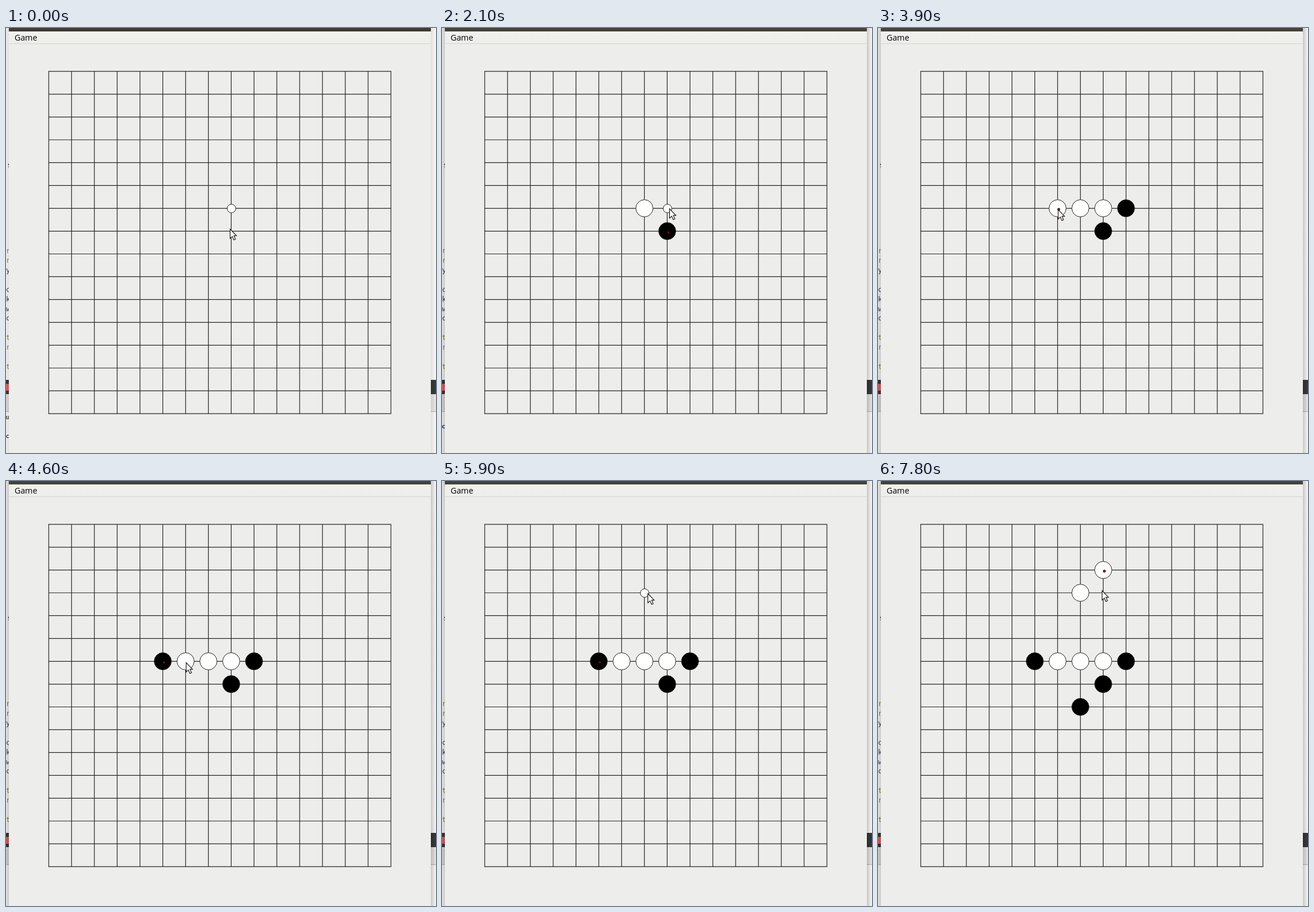
Animation, 753 px wide and 744 px high, one loop 8 s. Source, as an HTML page:

```html
<!DOCTYPE html>
<html lang="en">
<head>
<meta charset="utf-8">
<title>Board game</title>
<style>
  html, body { margin: 0; width: 100%; height: 100%; overflow: hidden; background: #ededeb; }
  svg { display: block; width: 100vw; height: 100vh; }
  .code { font: 12px "DejaVu Sans Mono", monospace; }
  .console { font-size: 11px; font-weight: 700; }
  .menu { font: 500 14.3px "Open Sans", sans-serif; }
</style>
</head>
<body>
<svg viewBox="0 0 753 744">
  <defs>
    <linearGradient id="fadeR"><stop stop-opacity=".2"/><stop offset="1" stop-opacity=".02"/></linearGradient>
    <linearGradient id="fadeL"><stop stop-opacity=".1"/><stop offset="1" stop-opacity=".2"/></linearGradient>
    <linearGradient id="bar" x2="0" y2="1"><stop stop-color="#f1f1ee"/><stop offset="1" stop-color="#ededea"/></linearGradient>
    <clipPath id="edge"><path d="M0 0H5V744H0Z"/></clipPath>
  </defs>
  <rect width="753" height="744" fill="#fbfbfa"/>
  <rect y="616" width="753" height="25" fill="#37393b"/>
  <rect y="641" width="753" height="30" fill="#e8e8e6"/>
  <rect y="643" width="5" height="28" fill="#dededc"/>
  <rect y="671" width="753" height="1" fill="#b4b4b2"/>
  <rect y="623" width="5" height="12" fill="#dc6468"/>
  <g id="code" class="code" clip-path="url(#edge)"></g>
  <g id="shadow">
    <rect width="5" height="744" fill="url(#fadeL)"/>
    <rect x="744" width="9" height="744" fill="url(#fadeR)"/>
  </g>
  <rect x="5" width="739" height="744" fill="#ededeb"/>
  <rect x="5" y="6" width="739" height="21" fill="url(#bar)"/>
  <rect x="5" y="27" width="739" height="1" fill="#d6d5d2"/>
  <rect id="title" x="5" width="739" height="6"/>
  <text class="menu" x="15" y="22">Game</text>
  <path id="grid" fill="none" stroke="#262626" stroke-width="1.2" stroke-linecap="square"/>
  <g id="stones" stroke="#222"></g>
  <circle id="hover" r="7.5" fill="#fff" stroke="#222"/>
  <circle id="mark" r="2" fill="#b00a0a" stroke="#000"/>
  <path id="cursor" d="M.5 1V17.4L4.3 13.9L7 20L9.8 18.7L7.2 12.7H11.6Z" fill="#fff" stroke="#1a1a1a" stroke-width="1.2"/>
</svg>
<script>
const LOOP = 8000, STEP = 100, REPLY = 700, PITCH = 39.95, LINES = 16;
const START = [392, 351];

// pointer journeys; a bend curves the way
const trips = [
  { from: 0, to: 300, end: [360, 325] },
  { from: 400, to: 500, end: [358, 318.5] },
  { from: 1700, to: 1900, end: [392, 317] },
  { from: 2000, to: 2100, end: [398, 315.5] },
  { from: 3300, to: 3600, end: [315, 317] },
  { from: 5000, to: 5900, end: [360, 196], bend: [392, 277] },
  { from: 7200, to: 7600, end: [392, 191] }
];

// white lands under the pointer, black answers after REPLY
const turns = [
  { click: 800, answer: [8, 7] },
  { click: 2300, answer: [9, 6] },
  { click: 3900, answer: [5, 6] },
  { click: 6100, answer: [7, 8] },
  { click: 7800 }
];

const $ = id => document.getElementById(id);
const colX = i => 74.8 + PITCH * i;
const rowY = j => 75.9 + PITCH * j;
const show = (el, on) => el.setAttribute('visibility', on ? 'visible' : 'hidden');
const place = (el, x, y) => el.setAttribute('transform', `translate(${x} ${y})`);

function add(parent, tag, attrs, text = '') {
  const el = document.createElementNS('http://www.w3.org/2000/svg', tag);
  for (const k in attrs) el.setAttribute(k, attrs[k]);
  el.textContent = text;
  return parent.appendChild(el);
}

function pointer(t) {
  let pos = START;
  for (const { from, to, end, bend } of trips) {
    if (t < from) break;
    const k = Math.min(1, (t - from) / (to - from)) ** .85;
    pos = pos.map((a, i) => {
      const mid = bend ? bend[i] : (a + end[i]) / 2;
      return a * (1 - k) ** 2 + 2 * mid * k * (1 - k) + end[i] * k * k;
    });
  }
  return pos;
}

const cellAt = ([x, y]) => [Math.round((x - colX(0)) / PITCH), Math.floor((y - 72) / PITCH)];

const stones = turns.flatMap(({ click, answer }) => {
  const white = { time: click, cell: cellAt(pointer(click)), fill: '#fff' };
  return answer ? [white, { time: click + REPLY, cell: answer, fill: '#000' }] : [white];
});
for (const s of stones) {
  s.el = add($('stones'), 'circle', { cx: colX(s.cell[0]), cy: rowY(s.cell[1]), r: 15, fill: s.fill });
}

let lines = '';
for (let i = 0; i < LINES; i++) {
  lines += `M${colX(i)} ${rowY(0)}V${rowY(LINES - 1)}M${colX(0)} ${rowY(i)}H${colX(LINES - 1)}`;
}
$('grid').setAttribute('d', lines);

// one letter per text row, cut off by the window
function column(text, x, y, pitch, fill, parent = $('code')) {
  [...text].forEach((ch, i) => {
    if (ch !== ' ') add(parent, 'text', { x, y: y + pitch * i, fill: fill(ch) }, ch);
  });
}
column('s', 2.5, 244, 17, () => '#222');
column('rry ckwc tr t', 0, 394, 16.92, ch => 'rt'.includes(ch) ? '#858426' : '#2d405c');

const logs = ['u c', 'c  u', ' c'].map((text, i) => {
  const el = add($('code'), 'g', { class: 'console' });
  column(text, -.5, 685, 16.3, () => i < 2 ? '#5c5648' : '#173a70', el);
  return el;
});

function draw(time) {
  const t = Math.floor(time / STEP) * STEP;
  const played = stones.filter(s => s.time <= t);
  stones.forEach(s => show(s.el, s.time <= t));

  const last = played[played.length - 1];
  show($('mark'), last);
  if (last) place($('mark'), colX(last.cell[0]) + 2, rowY(last.cell[1]) + 2);

  const pos = pointer(t);
  const [c, r] = cellAt(pos);
  place($('cursor'), ...pos);
  place($('hover'), colX(c) + .4, rowY(r) + .4);
  show($('hover'), !played.some(({ cell }) => cell[0] === c && cell[1] === r));

  const focused = t >= turns[0].click - STEP;
  $('shadow').setAttribute('opacity', focused ? 1 : .55);
  $('title').setAttribute('fill', played.length ? '#45443b' : '#3c3b34');
  const log = played.length > 2 ? -1 : played.length > 1 ? 2 : focused ? 1 : 0;
  logs.forEach((el, i) => show(el, i === log));
}

const start = performance.now();
function tick() {
  draw((performance.now() - start) % LOOP);
  requestAnimationFrame(tick);
}
tick();
</script>
</body>
</html>
```
